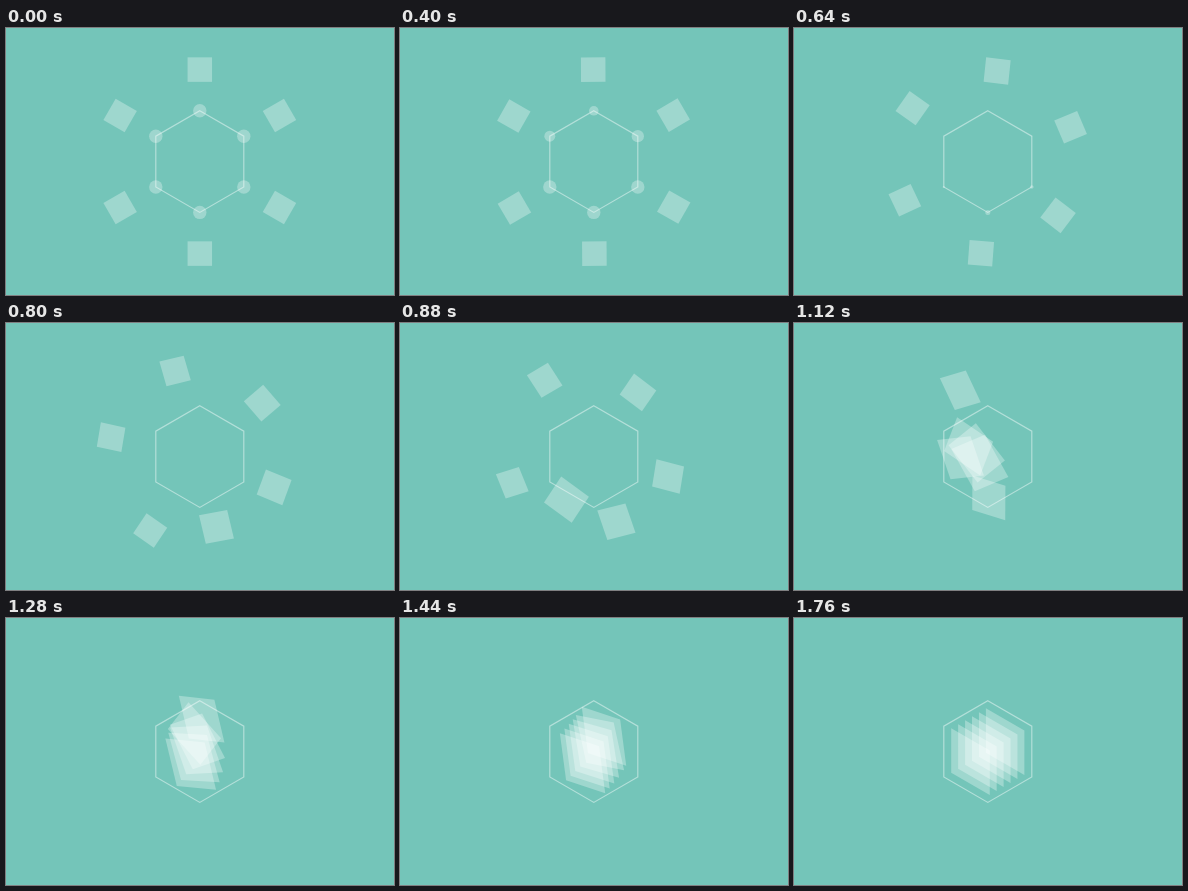
An HTML page with a canvas for the animation above (1960 ms loop, 388x267 px).

```html
<!DOCTYPE html>
<html lang="en">
<head>
<meta charset="utf-8">
<style>
  html, body { margin: 0; height: 100%; overflow: hidden; background: #74c5b9; }
  canvas { display: block; }
</style>
</head>
<body>
<canvas id="stage" width="388" height="267"></canvas>
<script>
const ctx = document.getElementById('stage').getContext('2d');
const LOOP = 1960, STEP = 40, START = 320;
const RAD = Math.PI / 180;
const CX = 193.8, CY = 133.6;

const KEY_TIMES = [320, 640, 800, 960, 1120, 1440, 1760];
const SPIN = [0, 4.3, 33, 103, 150, 171, 180];
const SKEW = [0, 0.7, 3, 10, 17, 27, 30];
const SPREAD = [0, 0, 0, 0.2, 0.6, 0.76, 1];

const clamp = x => Math.min(1, Math.max(0, x));
const quartInOut = x => x < 0.5 ? 8 * x ** 4 : 1 - 8 * (1 - x) ** 4;
const polar = (r, deg) => [r * Math.cos(deg * RAD), r * Math.sin(deg * RAD)];

// Smooth curve through the key values
function track(values, t) {
  const T = KEY_TIMES, last = T.length - 1;
  if (t <= T[0]) return values[0];
  if (t >= T[last]) return values[last];
  const slope = j => j === 0 || j === last ? 0
    : (values[j + 1] - values[j - 1]) / (T[j + 1] - T[j - 1]);
  const j = T.findIndex(time => time > t) - 1;
  const h = T[j + 1] - T[j], u = (t - T[j]) / h, v = 1 - u;
  return values[j] * v * v * (1 + 2 * u) + values[j + 1] * u * u * (3 - 2 * u)
    + h * u * v * (slope(j) * v - slope(j + 1) * u);
}

function drawHexagon() {
  ctx.beginPath();
  for (let i = 0; i < 6; i++) ctx.lineTo(...polar(50.8, i * 60 - 90));
  ctx.closePath();
  ctx.strokeStyle = 'rgba(255,255,255,.45)';
  ctx.lineWidth = 1.2;
  ctx.stroke();
}

function drawDots(t) {
  [270, 210, 330, 150, 30, 90].forEach((angle, i) => {
    const r = 6.7 * (1 - clamp((t - START - 29 * i) / 280));
    if (!r) return;
    ctx.beginPath();
    ctx.arc(...polar(50.8, angle), r, 0, 7);
    ctx.fill();
  });
}

function drawSquares(t) {
  const spin = track(SPIN, t), skew = track(SKEW, t) * RAD, spread = track(SPREAD, t);
  ctx.transform(Math.cos(skew), Math.sin(skew), 0, 1, 0, 0);
  for (let i = 0; i < 6; i++) {
    const e = quartInOut(clamp((t - START - i * 53.3) / 1173));
    const angle = 30 - 60 * i + spin + 60 * ((i + 1) % 6) * e;
    const [x, y] = polar(92 * (1 - e), angle);
    const size = 24.5 + 20 * e, shift = 8 * (i - 2.5) * spread * e;
    ctx.save();
    ctx.translate(x, y);
    ctx.rotate((spin - 180) * RAD);
    ctx.translate(shift, -shift);
    ctx.rotate((angle + 90 - spin + 180) * RAD);
    ctx.fillRect(-size / 2, -size / 2, size, size);
    ctx.restore();
  }
}

function draw(now) {
  const t = Math.floor((now % LOOP) / STEP) * STEP;
  ctx.setTransform(1, 0, 0, 1, 0, 0);
  ctx.fillStyle = '#74c5b9';
  ctx.fillRect(0, 0, 388, 267);
  ctx.translate(CX, CY);
  ctx.fillStyle = 'rgba(255,255,255,.3)';
  drawHexagon();
  drawDots(t);
  drawSquares(t);
}

const begin = performance.now();
function frame() {
  draw(performance.now() - begin);
  requestAnimationFrame(frame);
}
frame();
</script>
</body>
</html>
```
